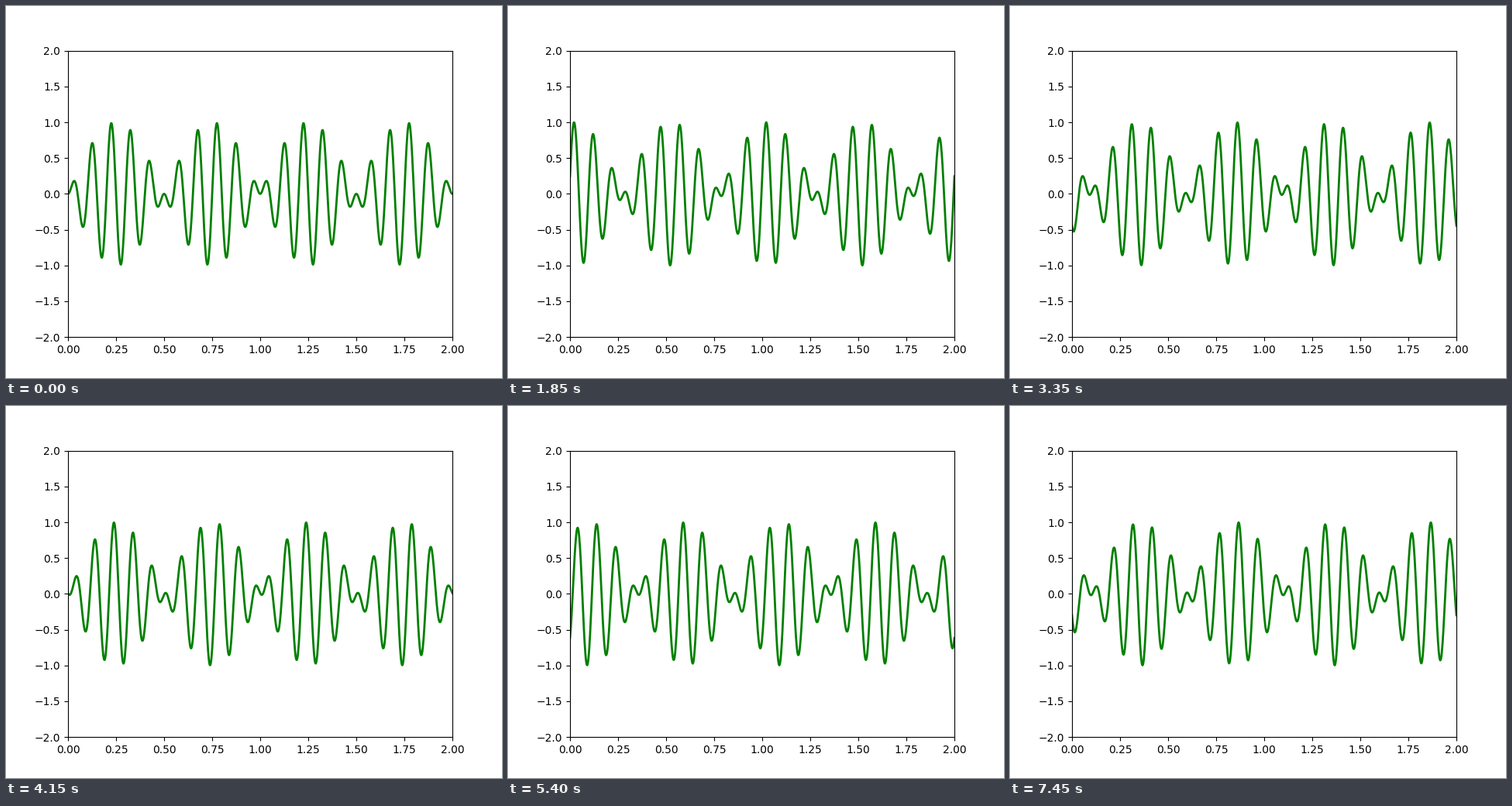
A matplotlib script for the animation above (7500 ms loop, 640x480 px).

```python
import numpy as np
import matplotlib.pyplot as plt
from matplotlib.animation import FuncAnimation

FRAMES = 150
INTERVAL = 50  # ms

fig = plt.figure(figsize=(6.4, 4.8), dpi=100)
ax = plt.axes(xlim=(0, 2), ylim=(-2, 2))
line, = ax.plot([], [], lw=2, color="green")
x = np.linspace(0, 2, 1000)


def wave(i):
    """Slow envelope drifting left times a fast carrier drifting right."""
    envelope = np.sin(2 * np.pi * (x + 0.006 * i))
    carrier = np.sin(20 * np.pi * (x - 0.008 * i))
    return envelope * carrier


def init():
    line.set_data(x, wave(0))
    return line,


def update(i):
    line.set_data(x, wave(i))
    return line,


anim = FuncAnimation(fig, update, init_func=init, frames=FRAMES,
                     interval=INTERVAL, repeat=True, repeat_delay=0)
plt.show()
```
